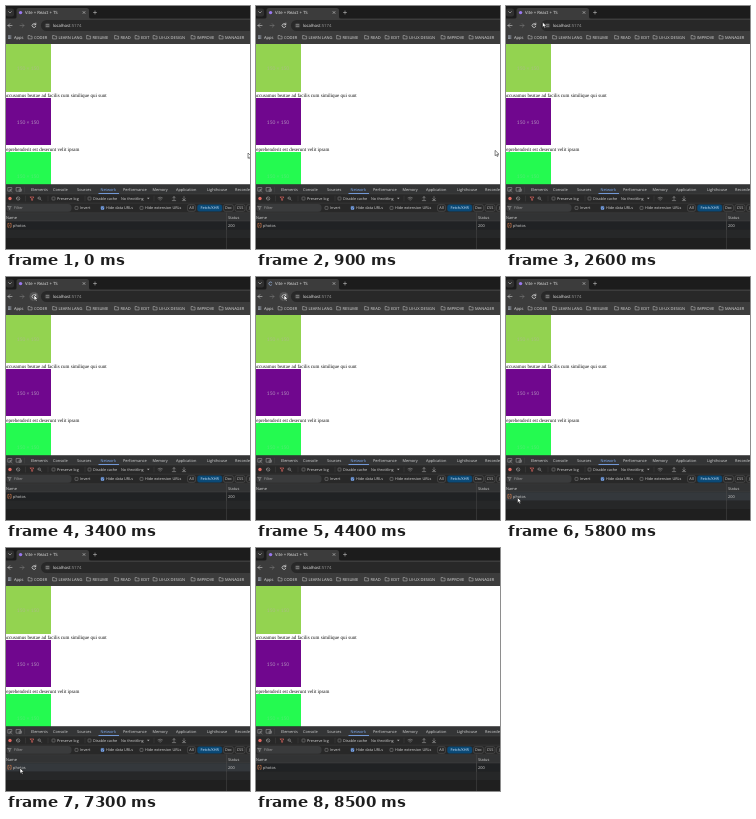
Recreate the animation shown at these times as an HTML page. Size 244 by 243 pixels, loop 8.6 s.

```html
<!DOCTYPE html>
<html lang="en">
<head>
<meta charset="utf-8">
<title>Network panel</title>
<style>
  html, body { margin: 0; width: 100%; height: 100%; overflow: hidden; background: #1f1f1f; }
  svg { display: block; width: 100%; height: 100%; }
  text { font-family: "Open Sans", "Noto Sans", sans-serif; text-rendering: geometricPrecision; white-space: pre; }
  .serif { font-family: "Liberation Serif", serif; }
  .label { font-family: Lato, sans-serif; }
</style>
</head>
<body>
<svg id="stage" viewBox="0 0 244 243" preserveAspectRatio="none"></svg>
<script>
const LOOP = 8600, STEP = 100;
const stage = document.getElementById('stage');

function add(tag, attrs, parent = stage) {
  const node = document.createElementNS('http://www.w3.org/2000/svg', tag);
  for (const key in attrs) node.setAttribute(key, attrs[key]);
  return parent.appendChild(node);
}
const group = () => add('g', {});
const rect = (x, y, width, height, fill, rx = 0, parent) => add('rect', { x, y, width, height, fill, rx }, parent);
const circle = (cx, cy, r, fill, parent) => add('circle', { cx, cy, r, fill }, parent);
const line = (d, stroke, width = 0.55, parent) =>
  add('path', { d, stroke, fill: 'none', 'stroke-width': width, 'stroke-linecap': 'round' }, parent);
function text(x, y, content, size, fill, extra = {}, parent) {
  const node = add('text', { x, y, 'font-size': size, fill, ...extra }, parent);
  node.textContent = content;
  return node;
}

// Tab strip
rect(0, 0, 244, 13, '#1c1c1c');
rect(0, 2.5, 8, 8, '#303030', 2);
line('M2.6 5.6l1.4 1.4l1.4-1.4', '#d5d5d5');
add('path', { d: 'M8 13q2.5 0 2.5-2.5v-6q0-2.5 2.5-2.5h67.500q2.500 0 2.500 2.500v6q0 2.500 2.500 2.500z', fill: '#3c3c3c' });
const favicon = circle(14.6, 6.6, 1.7, '#9a78f0');
const spinner = line('M14.600 4.900a1.700 1.700 0 1 1-1.700 1.700', '#a8c7fa');
text(19, 8.1, 'Vite + React + TS', 4.3, '#e6e6e6');
line('M77 5.500l2 2m0-2l-2 2', '#d5d5d5');
line('M87.500 6.500h3m-1.500-1.500v3', '#c8c8c8');

// Toolbar
rect(0, 12.5, 244, 26, '#3c3c3c');
rect(35, 14, 220, 11, '#282828', 5.500);
line('M6 19.500h-4m1.800-1.800l-1.800 1.800l1.800 1.800', '#d8d8d8');
line('M14 19.500h4m-1.800-1.800l1.800 1.800l-1.800 1.800', '#7d7d7d');
const hover = circle(28, 19.5, 4.6, '#555');
line('M29.700 18.600a1.900 1.900 0 1 0 .100 1.700m0-3.200v1.700h-1.700', '#e0e0e0', 0.7);
circle(41.500, 19.500, 2.800, '#3c3c3c');
line('M40.200 18.700h2.600m-2.600 1.600h2.600', '#d8d8d8', 0.45);
text(47, 21.1, 'localhost', 4.2, '#f0f0f0');
text(64.6, 21.1, ':5174', 4.2, '#a0a0a0');

// Bookmarks
for (let i = 0; i < 9; i++) rect(2 + (i % 3) * 1.2, 29.5 + Math.floor(i / 3) * 1.2, 0.8, 0.8, '#c9d4e8');
text(8, 32.8, 'Apps', 4.1, '#e0e0e0');
[[28, 'CODER'], [52.500, 'LEARN LANG'], [86.500, 'RESUME'], [114.500, 'READ'], [135, 'EDIT'],
 [153, 'UI-UX DESIGN'], [191, 'IMPROVE'], [219, 'MANAGER']].forEach(([x, name]) => {
  line(`M${x - 5.5} 29.500h1.300l.600.700h1.700v2.700h-3.600z`, '#d0d0d0', 0.45);
  text(x, 32.8, name, 4, '#e0e0e0');
});

// Page
rect(0, 38, 244, 141, '#fff');
function photo(y, height, fill, labelFill, caption) {
  rect(0, y, 45, height, fill);
  text(22, y + 25.6, '150 × 150', 4.9, labelFill, { class: 'label', 'text-anchor': 'middle' });
  if (caption) text(-1.5, y + 52.5, caption, 5, '#111', { class: 'serif' });
}
photo(38, 48, '#93d350', '#a9bd84', 'accusamus beatae ad facilis cum similique qui sunt');
photo(92, 47, '#70078e', '#b08fbc', 'reprehenderit est deserunt velit ipsam');
photo(146, 33, '#24fa50', '#50ea72');

// Developer tools
const INK = '#d6d6d6', DIM = '#a8a8a8', BLUE = '#7cacf8', EDGE = '#4a4a4a';
rect(0, 178.5, 244, 65, '#1f1f1f');
rect(0, 178.5, 244, 9.5, '#343536');
line('M3.800 185.200h-2v-3.700h4v1.600m-1.700.700l2 2m-2-2v1.500m0-1.500h1.500', DIM, 0.5);
line('M10.500 181.500h4v3.700h-4zm3 1.500h2v2.200h-2z', DIM, 0.5);
line('M18.500 181v5', EDGE, 0.4);
[[25, 'Elements'], [47, 'Console'], [71, 'Sources'], [94.500, 'Network'], [117, 'Performance'],
 [146.500, 'Memory'], [170, 'Application'], [201, 'Lighthouse'], [229, 'Recorder']].forEach(([x, name]) =>
  text(x, 185, name, 3.9, name === 'Network' ? BLUE : INK));
rect(92.5, 187, 20.500, 1, BLUE);

rect(0, 188, 244, 9.2, '#282828');
circle(4, 192.500, 1.700, '#e46962');
line('M10.400 192.500a1.700 1.700 0 1 0 3.400 0a1.700 1.700 0 1 0-3.400 0m.600-1.100l2.300 2.300', DIM, 0.5);
line('M19.500 190v5M42 190v5M79 190v5M148 190v5', EDGE, 0.4);
line('M24.300 191h3.600l-1.300 1.700v1.600h-1v-1.600z', '#e46962', 0.6);
line('M32 192.100a1.200 1.200 0 1 0 2.400 0a1.200 1.200 0 1 0-2.400 0m2.100.900l1.200 1.200', DIM, 0.5);

function checkbox(x, y, label, checked) {
  add('rect', { x, y: y - 3, width: 3, height: 3, rx: 0.5, fill: checked ? BLUE : 'none',
    stroke: checked ? BLUE : DIM, 'stroke-width': 0.4 });
  if (checked) line(`M${x + 0.7} ${y - 1.5}l.600.700l1.100-1.400`, '#222', 0.5);
  text(x + 5, y, label, 3.8, INK);
}
checkbox(46, 194, 'Preserve log');
checkbox(82, 194, 'Disable cache');
text(115, 194, 'No throttling', 3.8, INK);
add('path', { d: 'M141 191.800h2.600l-1.300 1.500z', fill: DIM });
line('M152 191.800q2.200-1.500 4.400 0m-3.500 1.200q1.300-.900 2.600 0m-1.300 1.100v.100', DIM, 0.5);
line('M168 194v-3.400m-1.300 1.300l1.300-1.300l1.300 1.300m-3 2.700h3.400', DIM, 0.5);
line('M178 190.600v3.400m-1.300-1.300l1.300 1.300l1.300-1.300m-3 1.900h3.400', DIM, 0.5);

rect(0, 197.200, 244, 9.600, '#282828');
rect(0.5, 198, 65, 7.800, '#3a3b3c', 3.500);
line('M2 200.500h3.200l-1.200 1.400v1.500h-.800v-1.500z', DIM, 0.5);
text(8, 203.4, 'Filter', 3.8, DIM);
checkbox(69, 203.4, 'Invert');
checkbox(95, 203.4, 'Hide data URLs', true);
checkbox(134, 203.4, 'Hide extension URLs');
[[181.500, 8, 'All'], [191.500, 24.500, 'Fetch/XHR'], [217.500, 10, 'Doc'], [229, 10, 'CSS'], [240.500, 8, 'JS']]
  .forEach(([x, width, name]) => {
    const active = name === 'Fetch/XHR';
    add('rect', { x, y: 198.700, width, height: 6.600, rx: 1.800, fill: active ? '#0b4a77' : 'none',
      stroke: active ? '#0b4a77' : '#6a6a6a', 'stroke-width': 0.4 });
    text(x + width / 2, 203.4, name, 3.8, active ? '#d3e8ff' : INK, { 'text-anchor': 'middle' });
  });

// Request table
rect(0, 206.800, 244, 8.200, '#323334');
rect(0, 215, 244, 8.500, '#202224');
rect(0, 223.500, 244, 8.500, '#262728');
rect(0, 232, 244, 11, '#1f1f1f');
line('M0 188h244M0 197.200h244M0 206.700h244M0 215h244', EDGE, 0.4);
line('M220.500 207v36', EDGE, 0.5);
text(0, 212.5, 'Name', 3.9, INK);
text(222, 212.5, 'Status', 3.9, INK);
const request = group();
const rowHover = rect(0, 215.200, 244, 8.300, '#34383c', 0, request);
line('M220.500 215v8.500', EDGE, 0.5, request);
line('M2.800 217.400h-.900v3.800h.900m1.400-3.800h.900v3.800h-.900m-.700-2v.200', '#f28b54', 0.55, request);
text(7, 220.8, 'photos', 3.9, INK, {}, request);
text(222, 220.8, '200', 3.9, INK, {}, request);

const pointer = add('path', { d: 'M0 0v5.400l1.250-1.150l.850 1.900l.950-.450l-.850-1.800h1.700z',
  fill: '#fff', stroke: '#111', 'stroke-width': 0.5 });

// Pointer path: time, x, y
const path = [
  [0, 242, 147], [600, 240, 145], [1700, 235, 141.500], [2000, 205, 115], [2500, 45, 14], [2700, 28, 18],
  [4600, 28, 18], [5200, 16, 229], [5500, 12, 226], [5800, 11.500, 220.500], [6300, 14, 219],
  [7300, 14, 220], [7700, 90, 224], [8000, 225, 190], [8100, 250, 170], [8600, 250, 170]
];
const reloads = [[3000, 3300], [4200, 4800]];

function pointerAt(t) {
  const i = path.findIndex(([time], k) => k && t <= time);
  const [t0, x0, y0] = path[i - 1], [t1, x1, y1] = path[i];
  const p = (t - t0) / (t1 - t0), e = p * p * (3 - 2 * p);
  return [x0 + (x1 - x0) * e, y0 + (y1 - y0) * e];
}
const show = (node, visible) => node.setAttribute('visibility', visible ? 'visible' : 'hidden');

function draw(t) {
  const [x, y] = pointerAt(t);
  const loading = reloads.some(([from, to]) => t >= from && t < to);
  pointer.setAttribute('transform', `translate(${x} ${y})`);
  show(hover, Math.hypot(x - 28, y - 19.5) < 5);
  show(request, !loading);
  show(favicon, !loading);
  show(spinner, loading);
  spinner.setAttribute('transform', `rotate(${t * 0.36} 14.6 6.6)`);
  rowHover.setAttribute('opacity', y > 215 && y < 223.5 && x < 244 ? 1 : 0);
}

const start = performance.now();
function tick() {
  const t = (performance.now() - start) % LOOP;
  draw(Math.floor(t / STEP) * STEP);
  requestAnimationFrame(tick);
}
tick();
</script>
</body>
</html>
```
